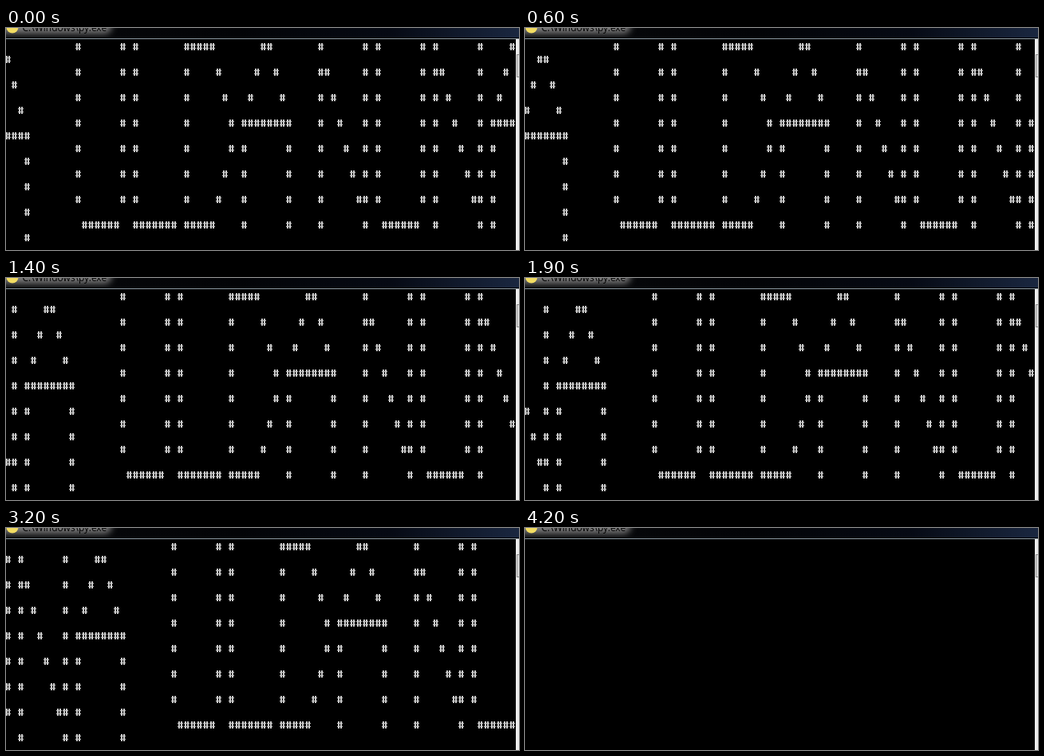
Recreate the animation shown at these times as an HTML page. Size 643 by 279 pixels, loop 4.3 s.

```html
<!DOCTYPE html>
<html lang="en">
<head>
<meta charset="utf-8">
<title>Console banner</title>
<style>
  html, body { margin: 0; width: 100%; height: 100%; overflow: hidden; background: #000; }
  svg { display: block; width: 643px; height: 279px; }
  .title { font: 12px "Open Sans", sans-serif; fill: #000; }
</style>
</head>
<body>
<svg viewBox="0 0 643 279">
  <defs>
    <linearGradient id="glass">
      <stop offset="0" stop-color="#08090b"/>
      <stop offset=".45" stop-color="#030407"/>
      <stop offset=".75" stop-color="#060a14"/>
      <stop offset="1" stop-color="#1a2740"/>
    </linearGradient>
    <filter id="soft" x="-20%" y="-100%" width="140%" height="300%">
      <feGaussianBlur stdDeviation="4"/>
    </filter>
    <clipPath id="bar"><rect width="643" height="12"/></clipPath>
    <clipPath id="screen"><rect y="14" width="638" height="265"/></clipPath>
  </defs>
  <rect width="643" height="279"/>
  <g clip-path="url(#bar)">
    <rect width="643" height="12" fill="url(#glass)"/>
    <rect x="-8" y="-14" width="140" height="21" rx="8" fill="#7c7c7c" filter="url(#soft)"/>
    <circle cx="8" cy="-1" r="7.5" fill="#f2dc62"/>
    <text class="title" x="20.5" y="4">C:\Windows\py.exe</text>
  </g>
  <rect y="13" width="643" height="1" fill="#8e9ca6"/>
  <path id="cells" clip-path="url(#screen)" fill="#c8c8c8" shape-rendering="crispEdges"/>
  <rect x="639" y="14" width="4" height="265" fill="#ececec"/>
  <rect x="640.5" y="33.5" width="6" height="28" fill="#dcdcdc" stroke="#8c8c8c"/>
</svg>
<script>
const LOOP = 4300, COLS = 80, INDENT = 11, ROWS = 8;
const CELL_W = 8, CELL_H = 16, LEFT = -1, TOP = 19;
const STEPS = [0, 100, 300, 500, 600, 800, 1000, 1200, 1400, 1600, 1900,
  2100, 2300, 2500, 2700, 2900, 3200, 3400, 3600, 3800, 4000, 4200];
const CLEARED = [500, 4200];

// Bitmap-style hash sign, 7 by 9 pixels, relative to its top left corner
const HASH = 'm1 0h2v9h-2z m3 0h2v9h-2z m-4 2h7v1h-7z m0 4h7v1h-7z';

const fill = (n, s) => Array(n).fill(s);
const GLYPHS = {
  A: ['   ##   ', '  #  #  ', ' #    # ', '########', ...fill(4, '#      #')],
  D: ['#####   ', '#    #  ', '#     # ', '#      #', '#      #', '#     # ', '#    #  ', '#####   '],
  L: [...fill(7, '#      '), '#######'],
  N: ['#      #', '##     #', '# #    #', '#  #   #', '#   #  #', '#    # #', '#     ##', '#      #'],
  U: [...fill(7, '#      #'), ' ###### '],
  ' ': fill(ROWS, '  ')
};
const banner = Array.from({ length: ROWS }, (_, r) =>
  [...'ULDA NUNA'].map(ch => GLYPHS[ch][r]).join(' '));

const cells = document.getElementById('cells');

// Each banner row takes two console lines: the second holds what wraps
function rowPath(row, r, shift) {
  return [...' '.repeat(INDENT + shift) + row].map((ch, i) => {
    if (ch !== '#') return '';
    const x = LEFT + CELL_W * (i % COLS);
    const y = TOP + CELL_H * (2 * r + Math.floor(i / COLS));
    return `M${x} ${y}${HASH}`;
  }).join('');
}

function render(ms) {
  const past = STEPS.filter(t => t <= ms);
  const blank = CLEARED.includes(past[past.length - 1]);
  const shift = past.filter(t => !CLEARED.includes(t)).length - 1;
  const d = blank ? '' : banner.map((row, r) => rowPath(row, r, shift)).join('');
  cells.setAttribute('d', d);
}

const start = performance.now();
function tick() {
  render((performance.now() - start) % LOOP);
  requestAnimationFrame(tick);
}
tick();
</script>
</body>
</html>
```
